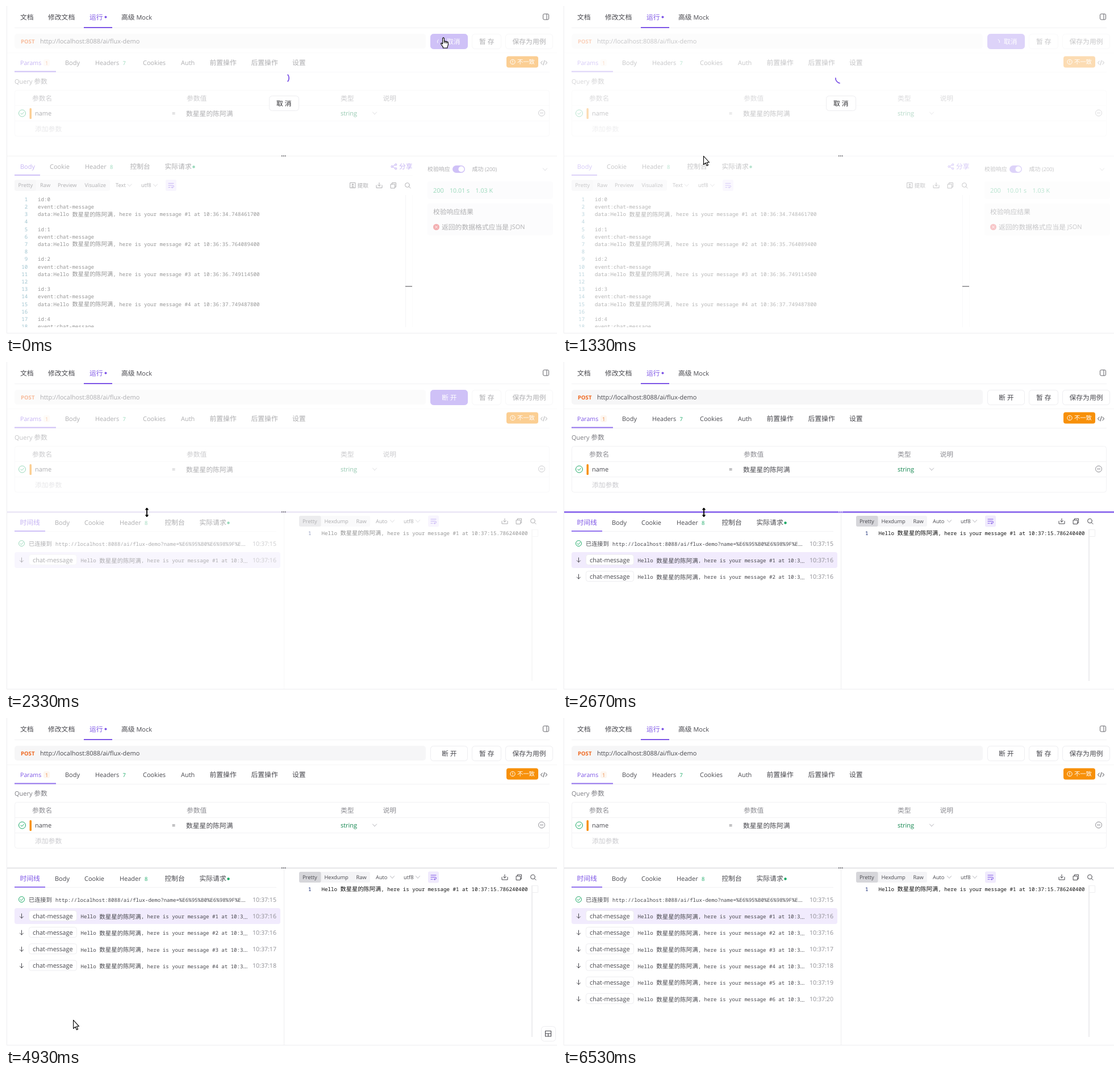
These frames come from a looping animation (970 px wide and 578 px high, 7270 ms). An HTML page with a canvas:

```html
<!DOCTYPE html>
<html lang="zh">
<head>
<meta charset="utf-8">
<title>SSE 调试</title>
<style>
html, body { margin: 0; width: 100%; height: 100%; overflow: hidden; background: #fff; }
canvas { display: block; width: 970px; height: 578px; }
</style>
</head>
<body>
<canvas id="stage"></canvas>
<script>
const W = 970, H = 578, LOOP = 7270, STEP = 200 / 3;
const canvas = document.getElementById('stage');
const c = canvas.getContext('2d');
const dpr = window.devicePixelRatio || 1;
canvas.width = W * dpr;
canvas.height = H * dpr;

const SANS = '"Open Sans", "Noto Sans", sans-serif';
const CJK = '"Noto Sans CJK SC", "Noto Sans CJK", sans-serif';
const MONO = '"Noto Sans Mono", "DejaVu Sans Mono", monospace';
const PURPLE = '#9373ee', VIOLET = '#7d55e6', GREEN = '#17a864', ORANGE = '#f79009';
const INK = '#48484e', GREY = '#8c8c92', LINE = '#f2f2f4', EDGE = '#ededf0';

const USER = '数星星的陈阿满';
const BASE = 'http://localhost:8088/ai/flux-demo';
const LINK = BASE + '?name=' + encodeURIComponent(USER);
const greet = (n, time) => `Hello ${USER}, here is your message #${n} at ${time}`;

// Moments of the story, ms
const CONNECT = 1600, SPLIT = 2130, READY = 2270;
const ARRIVE = [SPLIT, 2530, 3530, 4530, 5530, 6530];
const PATH = [[0, 770, 56], [130, 770, 56], [800, 247, 264], [3860, 247, 264],
  [4130, 239, 333], [4600, 195, 405], [4930, 119, 531], [5130, 64, 580]];

const clamp = v => Math.max(0, Math.min(1, v));
const ramp = (t, a, b) => clamp((t - a) / (b - a));
const smooth = v => v * v * (3 - 2 * v);

// Draws runs of Latin and Chinese text, returns the end x
function runs(s, x, y, color, latin, cjk, dy) {
  c.fillStyle = color;
  for (const part of s.match(/[\u2e80-\uffef]+|[^\u2e80-\uffef]+/g)) {
    const wide = part.charCodeAt(0) >= 0x2e80;
    c.font = wide ? cjk : latin;
    c.fillText(part, x, y + (wide ? dy + 0.4 : dy));
    x += c.measureText(part).width;
  }
  return x;
}
function text(s, x, y, color = INK, size = 11.8, weight = 400) {
  return runs(s, x, y, color, `${weight} ${size * 0.93}px ${SANS}`,
    `350 ${size}px ${CJK}`, size * 0.335);
}
function mono(s, x, y, color, size = 9.16, wide = 10.25) {
  return runs(s, x, y, color, `${size}px ${MONO}`, `350 ${wide}px ${CJK}`, 3.3);
}
function box(x, y, w, h, r, fill, stroke) {
  c.beginPath();
  c.roundRect(x, y, w, h, r);
  if (fill) { c.fillStyle = fill; c.fill(); }
  if (stroke) { c.strokeStyle = stroke; c.lineWidth = 1; c.stroke(); }
}
function rect(x, y, w, h, color) {
  c.fillStyle = color;
  c.fillRect(x, y, w, h);
}
function dot(x, y, r, color) {
  c.beginPath();
  c.arc(x, y, r, 0, 7);
  c.fillStyle = color;
  c.fill();
}
function arc(x, y, r, color, width = 1, from = 0, to = 2 * Math.PI) {
  c.beginPath();
  c.arc(x, y, r, from, to);
  c.strokeStyle = color;
  c.lineWidth = width;
  c.stroke();
}
// Strokes an SVG path placed at x, y
function icon(d, x, y, color, width = 1, fill) {
  c.save();
  c.translate(x, y);
  c.lineCap = c.lineJoin = 'round';
  const p = new Path2D(d);
  if (fill) { c.fillStyle = fill; c.fill(p); }
  c.strokeStyle = color;
  c.lineWidth = width;
  c.stroke(p);
  c.restore();
}
const chevron = (x, y) => icon('M-3.5 -2L0 2L3.5 -2', x, y, '#b4b4ba');
const download = (x, y) => icon('M0 -4.5V1.5M-2.5 -1L0 1.5L2.5 -1M-5 0V4.5H5V0', x, y, INK);
const copy = (x, y) => icon('M-4.5 -2H2.5V5H-4.5ZM-2.5 -2V-4.5H4.5V3H2.5', x, y, INK);
const search = (x, y) => icon('M3.2 -.5A3.8 3.8 0 1 1 -4.4 -.5A3.8 3.8 0 1 1 3.2 -.5M2.2 2.2L5 5', x, y, INK);
function check(x, y, r) {
  arc(x, y, r, GREEN);
  icon('M-2.6 0L-.6 2L2.8 -1.8', x, y, GREEN);
}
function wrapToggle(x, y) {
  box(x, y - 10, 19, 20, 3, '#f0eafd');
  icon('M-4.5 -3.5H4.5M-4.5 0H3Q5 0 5 1.8T3 3.6H1M2.3 2.2L1 3.6L2.3 5M-4.5 3.6H-1.5', x + 9.5, y, VIOLET);
}
function segments(x, y, w, picked, shade, items) {
  box(x, y - 9.5, w, 19, 3, '#f4f4f6');
  box(x, y - 9.5, picked, 19, 3, shade);
  for (const [s, tx] of items) text(s, tx, y, INK, 10);
}

function header() {
  text('文档', 25, 20);
  text('修改文档', 74, 20);
  text('运行', 147, 20, VIOLET);
  dot(175.5, 19.5, 2, VIOLET);
  text('高级 Mock', 203, 20);
  box(945.5, 14, 10, 10, 2, null, '#66666c');
  rect(951.5, 14, 1, 10, '#66666c');
  rect(15, 38, 942, 1, LINE);
  rect(137, 37, 50, 2, VIOLET);
}

function request(t) {
  box(15, 49, 724, 26, 5, '#f6f6f7');
  text('POST', 26, 63, '#ef6820', 10.3, 700);
  text(BASE, 60, 62.5);

  const busy = t < 2400;
  box(747.5, 49.5, 65, 26, 5, busy ? PURPLE : '#fff', busy ? PURPLE : EDGE);
  if (t < CONNECT) {
    const a = t * 0.0066 + 2.6;
    arc(764, 63, 4.5, '#fff', 1, a, a + 1.6);
    text('取消', 776, 63, '#fff');
  } else {
    text('断 开', 767, 63, busy ? '#fff' : INK);
  }
  box(820.5, 49.5, 51, 26, 5, '#fff', EDGE);
  text('暂 存', 833, 63);
  box(879.5, 49.5, 83, 26, 5, '#fff', EDGE);
  text('保存为用例', 891.5, 63);
  rect(2, 82, 968, 1, '#f6f6f7');

  rect(15, 116, 942, 1, LINE);
  text('Params', 25, 100, VIOLET, 11.4);
  box(66, 94, 11, 12, 3, '#fdf6ef');
  text('1', 69, 100.5, '#ef8a4a', 10);
  rect(15, 114.5, 73, 2, PURPLE);
  text('Body', 104, 100);
  text('Headers', 157, 100, INK, 11.6);
  text('7', 205.5, 100.5, GREEN, 10);
  text('Cookies', 241, 100);
  text('Auth', 308, 100);
  text('前置操作', 358.5, 100);
  text('后置操作', 431.5, 100);
  text('设置', 504, 100);
  box(881, 88.5, 56, 20, 4, ORANGE);
  arc(892, 98.5, 4.2, '#fff');
  rect(891.5, 96, 1, 3, '#fff');
  rect(891.5, 100, 1, 1, '#fff');
  text('不一致', 900, 98.5, '#fff', 10.3);
  icon('M-2.8 -3L-5.5 0L-2.8 3M2.8 -3L5.5 0L2.8 3M1 -4L-1 4', 947, 100, INK);

  text('Query 参数', 15, 133, '#7c7c82');
  box(15.5, 148.5, 941, 81, 4, null, LINE);
  rect(15, 175, 942, 1, LINE);
  rect(15, 202, 942, 1, LINE);
  [['参数名', 46], ['参数值', 318], ['类型', 589], ['说明', 663.5]]
    .forEach(([s, x]) => text(s, x, 162.5, GREY));
  check(28.5, 189, 6);
  box(41.5, 180, 3.5, 19, 1.5, ORANGE);
  text('name', 51, 189.5);
  text('=', 292, 189.5);
  text(USER, 317, 189.5);
  text('string', 589, 189.5, '#12864f');
  chevron(649, 189);
  arc(943, 188.5, 5.5, GREY);
  rect(940, 188, 6, 1, GREY);
  text('添加参数', 51, 216.5, '#cacace');
}

function divider(t) {
  const hot = ramp(t, 2270, 2530) * (1 - ramp(t, 3920, 4060));
  rect(2, 263, 968, 3, t < READY ? '#f4f4f5' : '#ececee');
  c.globalAlpha = hot;
  rect(2, 263, 968, 3, PURPLE);
  c.globalAlpha = 1;
}

function tabs(x, bodyColor) {
  text('Body', x, 283, bodyColor);
  text('Cookie', x + 52, 283);
  text('Header', x + 114, 283);
  text('8', x + 158, 283.5, GREEN, 10);
  text('控制台', x + 193.5, 283);
  text('实际请求', x + 254.5, 283);
  dot(x + 305.5, 283.5, 2.2, GREEN);
}

function editor() {
  rect(15, 298, 701, 1, LINE);
  tabs(25, VIOLET);
  rect(15, 297, 45, 2, PURPLE);
  icon('M-3 0L3 -3.5M-3 0L3 3.5', 683, 283, VIOLET);
  for (const [x, y] of [[-3.5, 0], [3.2, -3.5], [3.2, 3.5]]) {
    dot(683 + x, 283 + y, 2, VIOLET);
    dot(683 + x, 283 + y, 1, '#fff');
  }
  text('分享', 692, 283, VIOLET);

  segments(15, 316, 168, 38, '#ededf0',
    [['Pretty', 21.5], ['Raw', 60], ['Preview', 91], ['Visualize', 138.5]]);
  text('Text', 193, 316, INK, 10);
  chevron(217.5, 316);
  text('utf8', 238, 316, INK, 10);
  chevron(263, 316);
  wrapToggle(281, 316);
  icon('M-4.5 -4.5H4.5V4.5H-4.5ZM0 2.5V-2.5M-2 -.5L0 -2.5L2 -.5M-2 2.8H2', 610.5, 316, INK);
  text('提取', 618.5, 316, INK, 9.8);
  download(657, 316);
  copy(682, 316);
  search(707, 316);

  c.save();
  c.beginPath();
  c.rect(15, 333, 702, 233);
  c.clip();
  const stamps = ['34.748461700', '35.764089400', '36.749114500', '37.749487800'];
  for (let i = 0; i < 18; i++) {
    const k = i >> 2, y = 340.4 + i * 13.2;
    const line = [`id:${k}`, 'event:chat-message',
      'data:' + greet(k + 1, '10:36:' + stamps[k]), ''][i % 4];
    mono(String(i + 1), i < 9 ? 32.8 : 27.3, y, '#237893');
    if (line) mono(line, 56, y, '#111');
  }
  rect(703, 333, 1, 233, '#e8e8eb');
  rect(715, 333, 1, 233, '#f6f6f7');
  c.restore();

  text('校验响应', 742, 287.5, INK, 9.9);
  box(786, 281, 22, 13, 6.5, PURPLE);
  dot(801.5, 287.5, 5, '#fff');
  text('成功 (200)', 820.5, 287.5, INK, 10);
  chevron(949, 288);
  box(742, 309, 221, 31, 4, '#fafafb');
  text('200', 752, 325.5, GREEN);
  text('10.01 s', 781, 325.5, GREEN, 11.5);
  text('1.03 K', 826.5, 325.5, GREEN, 11.5);
  box(742, 348, 221, 56, 4, '#fafafb');
  text('校验响应结果', 752, 363);
  dot(757.5, 389.5, 5.5, '#e5484d');
  icon('M-1.8 -1.8L1.8 1.8M1.8 -1.8L-1.8 1.8', 757.5, 389.5, '#fff');
  text('返回的数据格式应当是 JSON', 767, 389.5);
}

function stream(t, pointer) {
  const split = t >= SPLIT;
  const right = split ? 476 : 716;
  rect(15, 298, right - 15, 1, LINE);
  text('时间线', 24.5, 283, t < 1930 ? INK : VIOLET);
  tabs(86, t < 1930 ? VIOLET : INK);
  rect(15, 297, 54, 2, PURPLE);

  const count = ARRIVE.filter(a => t >= a).length;
  for (let i = 0; i <= count; i++) {
    const y = 319.7 + i * 29.2;
    const over = t > 3930 && t < 5200 && Math.abs(pointer.y - y) <= 14.6;
    const fill = i === 1 ? '#f1ebfd' : over ? '#f4f4f5' : null;
    if (fill) box(15, y - 14, 468, 28, 4, fill);
    if (i === 0) {
      check(27.5, y, 5);
      text('已连接到', 40, y + 0.5, INK, 10.2);
      const end = mono(split ? LINK.slice(0, 60) : LINK, 87, y + 1, INK, 9.08);
      if (split) text('…', end, y + 1, INK, 10.8);
    } else {
      icon('M0 -4V4M-3 1L0 4L3 1', 27.5, y, INK);
      box(40.5, y - 9.5, 84, 18, 4, '#fff', EDGE);
      text('chat-message', 47, y);
      const end = mono(greet(i, '10:3'), 131.5, y + 1, INK, 9.08, 10.5);
      text('…', end, y + 1, INK, 10.8);
    }
    const sec = [15, 16, 16, 17, 18, 19, 20][i];
    text('10:37:' + sec, right - 42, y, GREY, 11.4);
  }
  if (split) detail();
}

function detail() {
  rect(489, 267, 1, 310, EDGE);
  segments(516, 280.5, 125, 38.5, '#d6d6da',
    [['Pretty', 522], ['Hexdump', 560.5], ['Raw', 616.5]]);
  text('Auto', 651, 280.5, INK, 10);
  chevron(680, 280.5);
  text('utf8', 700, 280.5, INK, 10);
  chevron(725, 280.5);
  wrapToggle(743, 280.5);
  download(878, 280.5);
  copy(903, 280.5);
  search(928, 280.5);
  mono('1', 532, 301.3, '#0b216f');
  mono(greet(1, '10:37:15.786240400'), 555.5, 301.3, '#111');
  rect(925.5, 295, 1, 267, '#dcdce0');
  box(926.5, 295.5, 10, 12, 0, null, '#eeeef0');
}

function waiting(t) {
  const a = t * 0.376 * Math.PI / 180;
  arc(489, 127, 9.2, VIOLET, 1.8, a - 0.75, a + 0.75);
  box(463.5, 158.5, 52, 26, 5, '#fff', EDGE);
  text('取 消', 476, 171.5, '#2c2c30');
}

function floatButton(t) {
  c.globalAlpha = ramp(t, 3990, 4120) * (1 - ramp(t, 4990, 5200));
  box(942.5, 543.5, 25, 26, 5, '#fff', EDGE);
  icon('M-5 -4.5H5V5H-5ZM-5 0H5M0 0V5', 954.5, 556, INK, 1.1);
  c.globalAlpha = 1;
}

function pointerAt(t) {
  let i = 1;
  while (i < PATH.length - 1 && t > PATH[i][0]) i++;
  const [t0, x0, y0] = PATH[i - 1], [t1, x1, y1] = PATH[i];
  let k = ramp(t, t0, t1);
  if (i === 2) k = smooth(k);
  return { x: x0 + (x1 - x0) * k, y: y0 + (y1 - y0) * k };
}

function cursor(t, { x, y }) {
  if (t > 5130) return;
  const rowsEnd = t >= ARRIVE[3] ? 451 : 422;
  if (t >= 2330 && t < 3920) {
    icon('M0 -7V7', 248, 265, '#000', 1.8);
    icon('M-2.4 -5L0 -8L2.4 -5ZM-2.4 5L0 8L2.4 5Z', 248, 265, '#000', 0.8, '#000');
  } else if (t < 190 || (t > 3930 && y > 305 && y < rowsEnd)) {
    icon('M-1.4 1Q0 -1.2 1.4 1V6.2Q2.8 5.2 3.9 6.7Q5.2 5.8 6.2 7.3Q8 6.7 8.4 8.6V12Q8 14.5 7 16V18H-.6V16.4L-4 11.5Q-5 9.4 -3.2 9.2L-1.4 11ZM1.4 6.2V9M3.9 6.7V9.2M6.2 7.3V9.5',
      x, y, '#000', 1.1, '#fff');
  } else {
    icon('M.5 .5V15.5L4 12.3L6.3 17.6L8.5 16.6L6.2 11.5H10.5Z', x, y, '#000', 1.1, '#fff');
  }
}

function draw(now) {
  const t = Math.floor((now % LOOP + 3.4) / STEP) * STEP;
  const pointer = pointerAt(t);
  c.setTransform(dpr, 0, 0, dpr, 0, 0);
  c.textRendering = 'geometricPrecision';
  rect(0, 0, W, H, '#fff');
  rect(1, 0, 1, 577, '#efeff1');
  rect(1, 576, 969, 1, '#efeff1');
  header();
  request(t);
  divider(t);
  if (t < CONNECT) editor();
  else stream(t, pointer);

  const veil = (0.56 + 0.13 * ramp(t, 0, 330)) * (1 - ramp(t, READY, 2600));
  rect(2, 40, 968, 536, `rgba(255,255,255,${veil})`);
  if (t < CONNECT) rect(703, 493.5, 12, 1.2, '#66666a');
  const dots = t >= 2400 && t < 3920 ? '#e2d9fb' : '#66666a';
  for (const dx of [-3, 0, 3]) dot(488.7 + dx, 264.3, 1, dots);
  if (t < READY) waiting(t);
  floatButton(t);
  cursor(t, pointer);
}

const start = performance.now();
function tick() {
  draw(performance.now() - start);
  requestAnimationFrame(tick);
}
tick();
</script>
</body>
</html>
```
